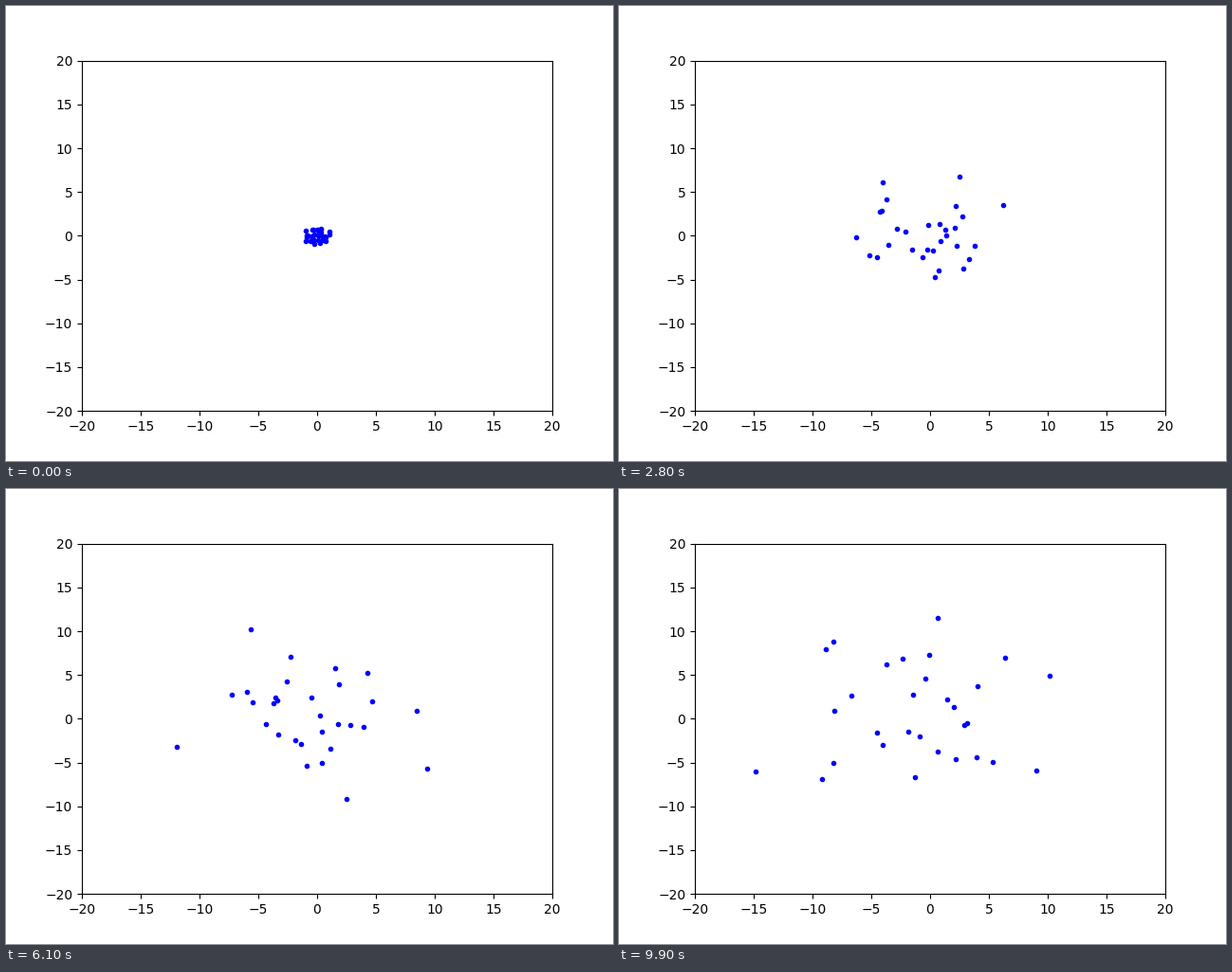
These frames come from a looping animation (640 by 480 pixels, 10 s). A matplotlib script:

```python
import numpy as np
import matplotlib.pyplot as plt
from matplotlib.animation import FuncAnimation

FRAMES = 100
COUNT = 30
DRIFT = (-1.1, 0.7)   # swarm centre at the end of the loop
SPREAD = (5.7, 5.2)   # standard deviation at the end of the loop


def random_walk(seed):
    """Uniform steps per walker, with the swarm's centre and spread guided."""
    rng = np.random.default_rng(seed)
    walk = rng.uniform(-1, 1, (FRAMES, COUNT, 2)).cumsum(axis=0)
    walk -= walk.mean(axis=1, keepdims=True)
    walk /= walk.std(axis=1, keepdims=True)
    t = (np.arange(FRAMES) + 1).reshape(-1, 1, 1) / FRAMES
    return walk * SPREAD * np.sqrt(t) + np.multiply(DRIFT, t)


walk = random_walk(7)

fig, ax = plt.subplots(figsize=(6.4, 4.8), dpi=100)
ax.set(xlim=(-20, 20), ylim=(-20, 20))
dots, = ax.plot([], [], "b.")


def update(i):
    dots.set_data(*walk[i].T)
    return dots,


anim = FuncAnimation(fig, update, frames=FRAMES, interval=100,
                     repeat=True, repeat_delay=0)
plt.show()
```
